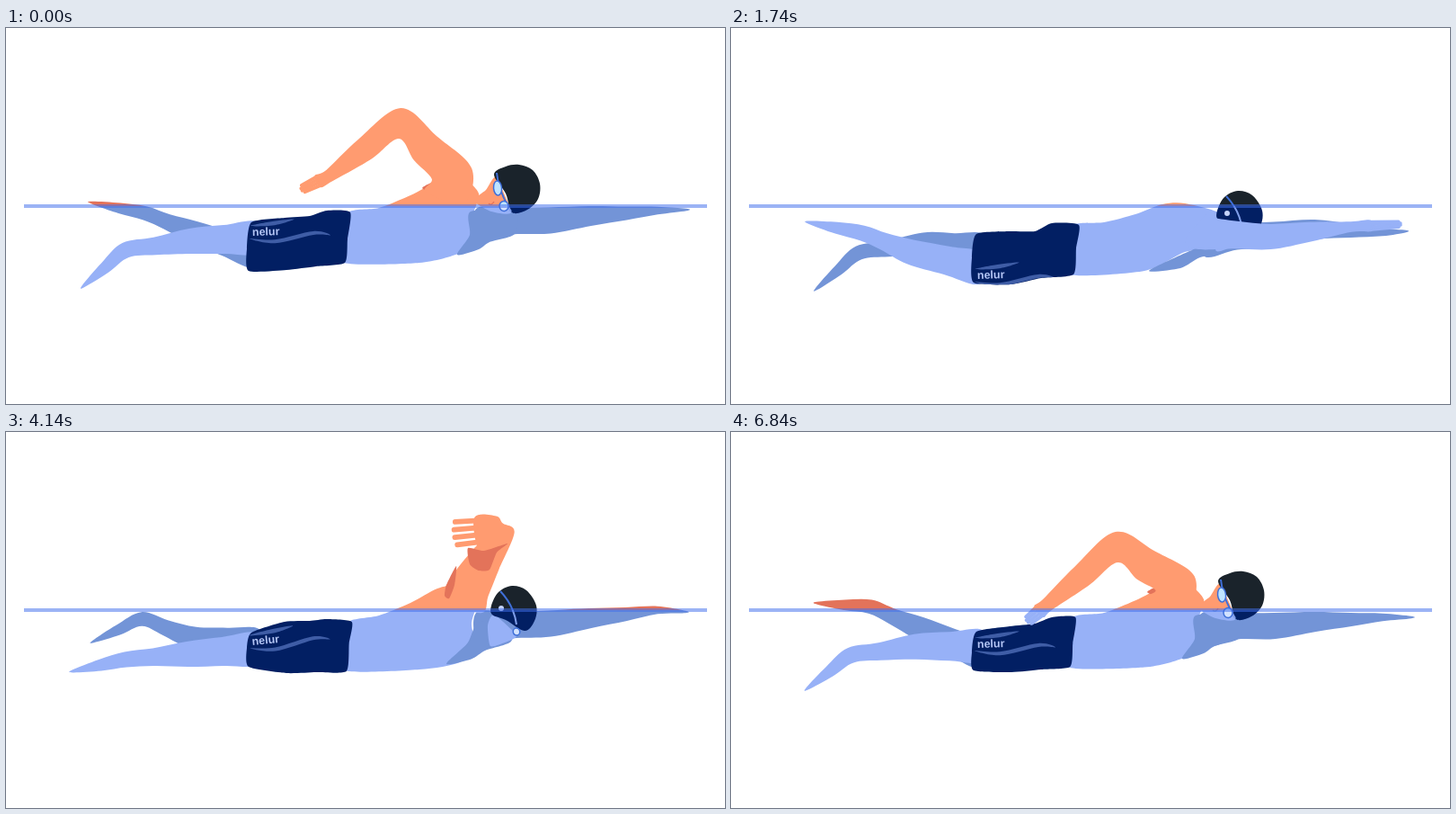
An HTML page with a canvas that plays this animation: 800 px wide and 418 px high, repeating every 6.96 s.

```html
<!DOCTYPE html>
<html lang="en">
<head>
<meta charset="utf-8">
<title>Swimmer</title>
<style>
html, body { margin: 0; width: 100%; height: 100%; overflow: hidden; background: #fff; }
canvas { display: block; width: 800px; height: 418px; }
</style>
</head>
<body>
<canvas id="stage" width="800" height="418"></canvas>
<script>
const ctx = document.getElementById('stage').getContext('2d');
const LOOP = 6960, STROKE = 3480, STEP = 60, WATER = 198;

const AIR = { skin: '#ff9b70', shade: '#e3735a', cap: '#1a232b', strap: '#3f6fd8', lens: '#bfe4ff' };
const SUB = { skin: '#97b1f7', shade: '#7394d7', cap: '#021f63', strap: '#7f9de8', lens: '#d3e2ff' };

const mix = (a, b, u) => a + (b - a) * u;
const clamp = u => Math.max(0, Math.min(1, u));
const unit = (x, y) => { const l = Math.hypot(x, y) || 1; return [x / l, y / l]; };
const tangent = (p, q) => p * q <= 0 ? 0 : 2 * p * q / (p + q);

// Smooth periodic track without overshoot: keys are [time, ...values]
function track(keys, period, time) {
  const n = keys.length, t = time % period;
  let i = n - 1;
  while (i > 0 && keys[i][0] > t) i--;
  const at = j => {
    const turn = Math.floor(j / n), [when, ...v] = keys[j - turn * n];
    return [when + turn * period, v];
  };
  const [a, b, c, d] = [at(i - 1), at(i), at(i + 1), at(i + 2)];
  const h = c[0] - b[0], u = (t - b[0]) / h, u2 = u * u, u3 = u2 * u;
  return b[1].map((y, k) => {
    const z = c[1][k], s = (z - y) / h;
    const m0 = tangent((y - a[1][k]) / (b[0] - a[0]), s);
    const m1 = tangent(s, (d[1][k] - z) / (d[0] - c[0]));
    return mix(y, z, 3 * u2 - 2 * u3) + h * (m0 * (u3 - 2 * u2 + u) + m1 * (u3 - u2));
  });
}

function blob(p, color, k = 1 / 6) {
  const n = p.length / 2, X = i => p[((i + n) % n) * 2], Y = i => p[((i + n) % n) * 2 + 1];
  ctx.beginPath();
  ctx.moveTo(X(0), Y(0));
  for (let i = 0; i < n; i++) {
    ctx.bezierCurveTo(
      X(i) + (X(i + 1) - X(i - 1)) * k, Y(i) + (Y(i + 1) - Y(i - 1)) * k,
      X(i + 1) - (X(i + 2) - X(i)) * k, Y(i + 1) - (Y(i + 2) - Y(i)) * k,
      X(i + 1), Y(i + 1));
  }
  ctx.closePath();
  ctx.fillStyle = color;
  ctx.fill();
}

// Limb from centre nodes [x, y] and half widths
function limb(nodes, widths, color) {
  const left = [], right = [], last = nodes.length - 1;
  const way = j => unit(nodes[j + 1][0] - nodes[j][0], nodes[j + 1][1] - nodes[j][1]);
  nodes.forEach(([x, y], i) => {
    const a = way(Math.max(i - 1, 0)), b = way(Math.min(i, last - 1));
    const [tx, ty] = unit(a[0] + b[0], a[1] + b[1]), w = widths[i];
    left.push(x - ty * w, y + tx * w);
    right.unshift(x + ty * w, y - tx * w);
  });
  blob(left.concat(right), color);
}

const between = (a, b, u) => [mix(a[0], b[0], u), mix(a[1], b[1], u)];

// Near arm: shoulder, elbow, wrist, finger tips, hand size
const reach = [525, 228, 600, 232, 690, 221, 746, 218, 1];
const ARM = [
  [0, 496, 162, 438, 106, 360, 164, 328, 180, 1],
  [330, 505, 165, 500, 90, 435, 128, 398, 146, 1.4],
  [660, 516, 172, 549, 115, 541, 109, 498, 113, 2.3],
  [900, 525, 178, 568, 130, 610, 140, 650, 162, 1.6],
  [1140, 530, 200, 590, 188, 665, 195, 715, 208, 1],
  [1420, ...reach],
  [1860, ...reach],
  [2300, 535, 240, 608, 272, 668, 318, 700, 350, 1],
  [2700, 540, 255, 568, 318, 573, 380, 559, 416, 1.1],
  [2940, 515, 245, 530, 305, 488, 362, 465, 384, 1],
  [3060, 505, 225, 470, 258, 420, 308, 392, 328, 1],
  [3200, 498, 187, 440, 172, 372, 228, 345, 245, 1],
  [3360, 494, 168, 429, 128, 352, 192, 329, 211, 1.1]
];

function drawArm([sx, sy, ex, ey, wx, wy, tx, ty, size], color, shades) {
  const S = [sx, sy], E = [ex, ey], W = [wx, wy], T = [tx, ty];
  const girth = mix(0.83, 1, clamp((230 - ey) / 80));
  const hand = 7 * girth * size, K = between(W, T, 0.42);
  const nodes = [[sx - 8, mix(sy, 215, 0.5)], S, between(S, E, 0.5), E, between(E, W, 0.5), W, K];
  const widths = [22, 23, 18.5, 17, 13].map(w => w * girth).concat(hand, hand);
  limb(nodes, widths, color);
  shades();
  const [dx, dy] = unit(tx - K[0], ty - K[1]);
  ctx.strokeStyle = color;
  ctx.lineCap = 'round';
  ctx.lineWidth = 2.2 + hand * 0.22;
  for (const u of [-1, -0.33, 0.33, 1]) {
    const a = u * hand * 0.75, b = u * (hand * 0.95 - 2.5), back = Math.abs(u) * 3;
    ctx.beginPath();
    ctx.moveTo(K[0] - dy * a, K[1] + dx * a);
    ctx.lineTo(tx - dy * b - dx * back, ty + dx * b - dy * back);
    ctx.stroke();
  }
}

// One kick: phase, knee, ankle, toe; the far leg runs half a kick behind
const KICK = [
  [0, 205, 237, 133, 247, 86, 287],
  [0.33, 200, 216, 142, 195, 88, 220],
  [0.5, 200, 249, 146, 228, 86, 216],
  [0.68, 205, 266, 135, 290, 76, 309],
  [0.83, 202, 247, 133, 253, 74, 266]
];
const BEAT = [[0, 0], [660, 0.83], [1740, 1.5], [2700, 2.33], [3360, 2.97], [3480, 3]];
const LEG = [17, 16, 14, 9.8, 8.7, 6.5, 1.5];

function beat(s) {
  const i = BEAT.findIndex(b => b[0] > s), [a, b] = [BEAT[i - 1], BEAT[i]];
  return mix(a[1], b[1], (s - a[0]) / (b[0] - a[0]));
}

function drawLeg(phase, hip, dx, dy, girth, color) {
  const [kx, ky, ax, ay, tx, ty] = track(KICK, 1, phase);
  const H = [281, hip], K = [kx + dx, ky + dy], A = [ax + dx, ay + dy], T = [tx + dx, ty + dy];
  limb([H, between(H, K, 0.5), K, between(K, A, 0.55), A, between(A, T, 0.48), T],
    LEG.map(w => w * girth), color);
}

// Body roll: near hip, far hip, far leg drop, print height, print tilt
const ROLL = [
  [0, 233, 252, -22, 231, -0.03],
  [660, 241, 235, 13, 237, -0.1],
  [1740, 268, 245, 3, 279, -0.03],
  [2700, 240, 255, 22, 256, 0.2],
  [3360, 238, 248, -26, 240, -0.03]
];

// Outlines with fixed x and moving y
const SHORTS_X = [273, 310, 338, 357, 383, 380, 377, 345, 312, 270, 268];
const SHORTS = [
  [0, 216, 211, 209, 203, 205, 235, 261, 265, 269, 270, 245],
  [660, 223, 211, 210, 208, 211, 235, 266, 267, 268, 261, 240],
  [1740, 229, 226, 226, 217, 219, 245, 274, 278, 285, 283, 255],
  [2700, 226, 226, 227, 218, 219, 245, 272, 274, 270, 264, 248],
  [3360, 222, 216, 213, 206, 206, 235, 261, 264, 267, 265, 245]
];
const TORSO_X = [381, 415, 450, 480, 505, 526, 518, 521, 505, 460, 376, 379];
const TORSO = [
  [0, 205, 200, 186, 171, 165, 184, 212, 232, 250, 261, 261, 235],
  [660, 211, 204, 190, 174, 170, 181, 212, 236, 256, 264, 265, 235],
  [1740, 219, 216, 207, 196, 195, 206, 222, 243, 249, 270, 274, 245],
  [2700, 219, 216, 207, 196, 195, 206, 222, 246, 256, 270, 272, 245]
];
const CHEST = [
  [0, 502, 252, 516, 230, 517, 204, 566, 204, 566, 229, 538, 238, 526, 246],
  [1740, 465, 270, 508, 249, 545, 235, 552, 240, 548, 250, 522, 255, 500, 267],
  [2700, 465, 270, 508, 256, 520, 250, 535, 262, 538, 283, 519, 258, 500, 268],
  [3300, 502, 252, 516, 230, 517, 204, 566, 204, 566, 229, 538, 238, 526, 246]
];
const weave = (xs, ys) => xs.flatMap((x, i) => [x, ys[i]]);

// Far arm: height at upper arm, forearm, hand and tip, then tip x
const LEAD = [
  [0, 215, 209, 203, 202, 757], [660, 218, 212, 205, 202, 757],
  [1740, 232, 224, 227, 226, 751], [2700, 223, 222, 218, 216, 749],
  [3480, 215, 209, 203, 202, 757], [4140, 215, 207, 198, 200, 756],
  [5220, 232, 224, 226, 223, 751], [6180, 223, 222, 218, 216, 749],
  [6840, 216, 211, 206, 206, 757]
];

function drawLead([a, b, c, d, x], color) {
  limb([[525, a + 4], [562, a], [605, (a + b) / 2 + 2], [650, b], [690, (b + c) / 2], [725, c], [x, d]],
    [18, 14.5, 14.5, 11, 7.5, 4.3, 1.2], color);
}

// Head: cap, strap, face, lenses, dot; turned to breathe or facing down
const BREATHE = [543,163, 556,154, 571,152, 586,158, 594,173, 592,190, 580,202, 563,205, 556,184,
  546,161, 551,182, 562,204, 545,166, 534,180, 520,192, 540,204, 562,205, 547,178, 554,198, 557,180];
const DOWN = [540,193, 548,178, 563,171, 579,176, 590,193, 588,210, 577,221, 556,209, 541,203,
  550,177, 562,194, 568,214, 543,203, 536,215, 539,238, 555,234, 568,226, 562,220, 568,222, 551,196];
// Turn to breathe, shift x, shift y
const HEAD = [[0, 1, 0, 0], [660, 1, 2, 1], [900, 1, 2, 1], [1400, 0, 1, 10], [1740, 0, 1, 10],
  [2700, 0, -2, 14], [4140, 0, 0, 0], [4900, 0, 1, 10], [5220, 0, 1, 10], [6180, 0, -2, 14],
  [6300, 0, -2, 14], [6700, 1, -1, 3], [6840, 1, -1, 3]];

function lens(x, y, size, rx, ry, pal) {
  if (size < 0.05) return;
  ctx.beginPath();
  ctx.ellipse(x, y, rx * size, ry * size, -0.1, 0, 7);
  ctx.fillStyle = pal.lens;
  ctx.fill();
  ctx.strokeStyle = '#3f6fd8';
  ctx.lineWidth = 1.5;
  ctx.stroke();
}

function drawHead([turn, dx, dy], pal) {
  const h = DOWN.map((v, i) => mix(v, BREATHE[i], turn) + (i % 2 ? dy : dx));
  blob(h.slice(24, 34), pal.skin, 0.1);
  blob(h.slice(0, 18), pal.cap);
  const [ax, ay, bx, by, cx, cy] = h.slice(18, 24);
  ctx.beginPath();
  ctx.moveTo(ax, ay);
  ctx.quadraticCurveTo(bx * 2 - (ax + cx) / 2, by * 2 - (ay + cy) / 2, cx, cy);
  ctx.strokeStyle = pal.strap;
  ctx.lineWidth = 2;
  ctx.stroke();
  const [x1, y1, x2, y2, px, py] = h.slice(34);
  lens(x1, y1, turn, 4.5, 8, pal);
  lens(x2, y2, mix(0.75, 1, turn), 5, 5.5, pal);
  if (turn > 0.5) {
    ctx.beginPath();
    ctx.moveTo(x1 - 10, y1 + 17);
    ctx.quadraticCurveTo(x1 - 7, y1 + 20, x1 - 4, y1 + 15);
    ctx.strokeStyle = pal.shade;
    ctx.lineWidth = 1.4;
    ctx.stroke();
  }
  ctx.beginPath();
  ctx.arc(px, py, 3 * (1 - turn), 0, 7);
  ctx.fillStyle = '#c3d2f8';
  ctx.fill();
}

function drawShorts(ys, y, tilt, pal) {
  const sway = clamp((ys[4] - 205) / 14) * 4;
  blob(weave(SHORTS_X.map((x, i) => i > 3 && i < 7 ? x + sway : x), ys), pal.cap, 0.1);
  ctx.save();
  ctx.clip();
  ctx.translate(274, y);
  ctx.rotate(tilt);
  blob([-2,-11, 20,-15, 47,-17, 25,-11], '#3f5da6');
  blob([-3,3, 25,5, 68,-3, 87,2, 68,1, 25,9], '#3f5da6');
  ctx.fillStyle = '#b4c5f5';
  ctx.font = 'bold 12.5px "Liberation Sans", Arial, sans-serif';
  ctx.fillText('nelur', 0, 0);
  ctx.restore();
}

function drawTorso(ys, color) {
  const ahead = clamp((ys[0] - 211) / 8) * 18;
  blob(weave(TORSO_X.map((x, i) => i > 4 && i < 8 ? x + ahead : x), ys), color, 0.13);
}

function armShades(s, color) {
  const over = clamp(1.5 - Math.abs(s - 660) / 120);
  if (!over) return;
  ctx.globalAlpha = over;
  blob([488,182, 490,170, 501,149, 499,170, 493,185], color, 0.1);
  blob([514,129, 532,132, 558,124, 546,134, 538,153, 526,154, 516,147], color, 0.1);
  ctx.globalAlpha = 1;
}

function scene(t, pal) {
  const s = t % STROKE, part = keys => track(keys, STROKE, s);
  const [nearHip, farHip, drop, printY, tilt] = part(ROLL);
  const kick = beat(s);

  drawLeg(kick + 0.5, farHip, 9, drop, 0.9, pal.shade);
  drawLead(track(LEAD, LOOP, t), pal.shade);
  drawLeg(kick, nearHip, 0, 0, 1, pal.skin);
  drawTorso(part(TORSO), pal.skin);
  blob(part(CHEST), pal.shade, 0.13);
  drawShorts(part(SHORTS), printY, tilt, pal);
  drawHead(track(HEAD, LOOP, t), pal);
  if (s >= 3300 || s < 240) blob([463,178, 474,172, 484,176, 492,188, 476,184], pal.shade, 0.1);
  drawArm(part(ARM), pal.skin, () => armShades(s, pal.shade));
}

function half(y, h, t, pal) {
  ctx.save();
  ctx.beginPath();
  ctx.rect(0, y, 800, h);
  ctx.clip();
  scene(t, pal);
  ctx.restore();
}

function frame(now) {
  const t = Math.min(Math.floor((now % LOOP) / STEP) * STEP, LOOP - 2 * STEP);
  ctx.fillStyle = '#fff';
  ctx.fillRect(0, 0, 800, 418);
  half(0, WATER, t, AIR);
  half(WATER, 418 - WATER, t, SUB);
  ctx.fillStyle = 'rgba(64,110,236,0.52)';
  ctx.fillRect(20, 196, 760, 4);
  requestAnimationFrame(frame);
}
frame(0);
</script>
</body>
</html>
```
